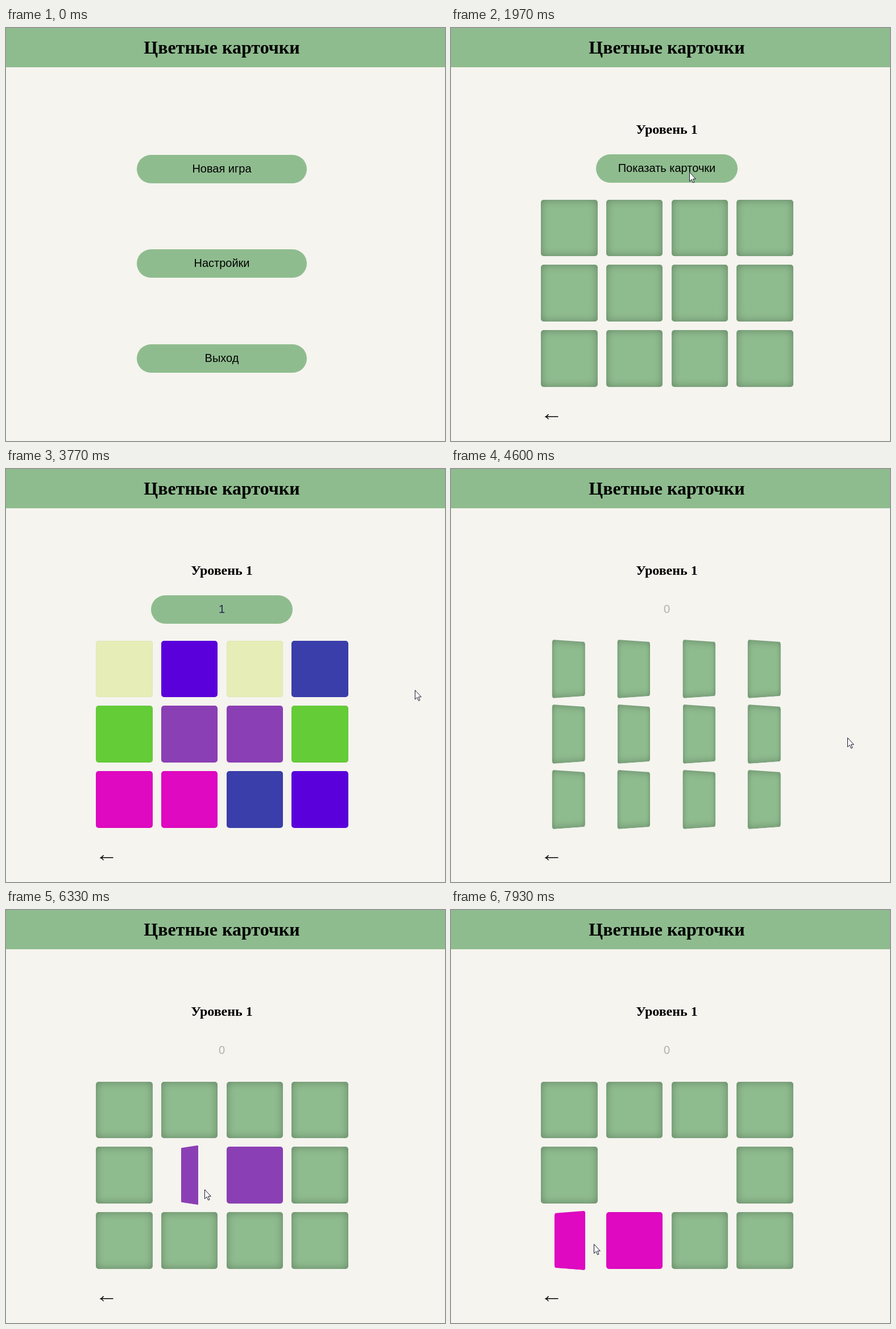
Animation of 772x726 px, one loop 8 s. Source, as an HTML page:

```html
<!DOCTYPE html>
<html lang="ru">
<head>
<meta charset="utf-8">
<title>Цветные карточки</title>
<style>
  html, body { margin: 0; width: 100%; height: 100%; overflow: hidden; background: #f5f4ef; }
  body { position: relative; color: #000; }
  header { position: absolute; inset: 0 0 auto; height: 69px; background: #8fbc8f; }
  h1, h2 {
    position: absolute; left: 0; width: 759px; margin: 0; text-align: center;
    font-family: "Liberation Serif", "Times New Roman", serif; font-weight: bold;
  }
  h1 { top: 0; font-size: 32px; line-height: 69px; }
  h2 { top: 163px; font-size: 24px; line-height: 30px; }
  .screen { position: absolute; inset: 0; opacity: 0; }
  .pill {
    position: absolute; left: 230px; width: 299px; height: 49.5px; border-radius: 25px;
    background: #8fbc8f; text-align: center;
    font: 20px/49.5px "Liberation Sans", Arial, sans-serif;
  }
  .show { left: 255px; top: 222px; width: 249px; }
  .count { color: #25274f; }
  .done { color: rgba(16, 16, 16, .3); background: none; }
  .cell { position: absolute; perspective: 1000px; }
  .card { position: absolute; inset: 0; transform-style: preserve-3d; }
  .face { position: absolute; inset: 0; border-radius: 5px; backface-visibility: hidden; }
  .back { background: #8fbc8f; box-shadow: inset 0 0 15px rgba(0, 0, 0, .3); }
  .front { transform: rotateY(180deg); box-shadow: inset 0 0 1px rgba(0, 0, 0, .2); }
  svg { position: absolute; left: 0; top: 0; overflow: visible; }
</style>
</head>
<body>
<header><h1>Цветные карточки</h1></header>
<div class="screen" id="menu"></div>
<div class="screen" id="game">
  <h2>Уровень 1</h2>
  <div class="pill show" id="ask">Показать карточки</div>
  <div class="pill show count" id="two">2</div>
  <div class="pill show count" id="one">1</div>
  <div class="pill show done" id="zero">0</div>
  <svg width="1" height="1" fill="none" stroke="#000" stroke-width="1.4">
    <path d="M167 683.3H188.5M171.5 679Q169.5 682 166.3 683.3Q169.5 684.6 171.5 687.6"/>
  </svg>
</div>
<svg id="cursor" width="13" height="21">
  <path d="M.5 .5V16.6L4.2 13.2L6.6 19L9 18L6.6 12.3H11.3Z" fill="#fff" stroke="#15152a"/>
</svg>

<script>
const LOOP = 8000;
const FLIP = 500;
const SPAN = LOOP + FLIP; // leaves room for a flip that the loop cuts short
const ENTER = 330, GAME_START = 1440, REVEAL = 2355, TICK = 1020;
const CONCEAL = REVEAL + 2 * TICK;

const $ = id => document.getElementById(id);
const tracks = [];

// steps: [ms, value, easing towards the next step]
function track(el, prop, steps) {
  const first = steps[0], last = steps[steps.length - 1];
  const frames = [[0, first[1]], ...steps, [SPAN, last[1]]].map(([ms, value, easing = 'linear']) =>
    ({ offset: ms / SPAN, [prop]: value, easing }));
  const anim = el.animate(frames, { duration: SPAN, fill: 'both' });
  anim.pause();
  tracks.push(anim);
}

function visible(el, from, to = SPAN) {
  const hold = 'steps(1)';
  track(el, 'opacity', [[0, from ? 0 : 1, hold], [from, 1, hold], [to, to < SPAN ? 0 : 1, hold]]);
}

function flips(el, times) {
  const turn = n => `rotateY(${n % 2 * 180}deg)`;
  track(el, 'transform', times.flatMap((ms, i) =>
    [[ms, turn(i), 'ease'], [ms + FLIP, turn(i + 1)]]));
}

function addBox(parent, className, text = '') {
  const el = document.createElement('div');
  el.className = className;
  el.textContent = text;
  return parent.appendChild(el);
}

const buttons = ['Новая игра', 'Настройки', 'Выход'].map((label, i) => {
  const button = addBox($('menu'), 'pill', label);
  button.style.top = 222.7 + i * 166.7 + 'px';
  return button;
});
track(buttons[0], 'transform', [[880, 'scale(1)', 'ease'], [1080, 'scale(1.05)']]);

visible($('menu'), 0, GAME_START);
visible($('game'), GAME_START);
visible($('cursor'), ENTER);
visible($('ask'), 0, REVEAL);
visible($('two'), REVEAL, REVEAL + TICK);
visible($('one'), REVEAL + TICK, CONCEAL);
visible($('zero'), CONCEAL);

const lime = '#64cc37', sand = '#e6edb7', indigo = '#5a00db';
const blue = '#3a3eaa', purple = '#8b3fb4', pink = '#de09c0';
const deck = [sand, indigo, sand, blue, lime, purple, purple, lime, pink, pink, blue, indigo];
const picks = { 6: 5200, 5: 6156, 9: 7010, 8: 7730 };

// Whole-pixel edges of the n-th card along one axis
function edges(origin, n) {
  const start = origin + n * 114.7;
  const from = Math.round(start);
  return [from + 'px', Math.round(start + 99.4) - from + 'px'];
}

deck.forEach((color, i) => {
  const cell = addBox($('game'), 'cell');
  const [left, width] = edges(158.3, i % 4);
  const [top, height] = edges(301.7, Math.floor(i / 4));
  Object.assign(cell.style, { left, width, top, height });
  const card = addBox(cell, 'card');
  addBox(card, 'face back');
  addBox(card, 'face front').style.background = color;
  flips(card, [REVEAL, CONCEAL, picks[i]].filter(Boolean));
  if (color === purple) visible(cell, 0, picks[5] + FLIP);
});

// Cursor moves: start, end, destination; it rests in between
const moves = [
  [ENTER, 1310, 419, 253],
  [2450, 2740, 606, 260, 'ease-in'],
  [2740, 3560, 717, 355],
  [3560, 4050, 720, 410],
  [4250, 4600, 697, 472],
  [4600, 5150, 430, 505],
  [5550, 5850, 349, 491],
  [6430, 6830, 330, 576],
  [7250, 7650, 251, 587]
];
let place = 'translate(746px, 712px)';
track($('cursor'), 'transform', moves.flatMap(([from, to, x, y, easing = 'ease-out']) => {
  const start = place;
  place = `translate(${x}px, ${y}px)`;
  return [[from, start, easing], [to, place]];
}));

let begin;
function render(now) {
  begin ??= now;
  const time = (now - begin) % LOOP;
  for (const anim of tracks) anim.currentTime = time;
  requestAnimationFrame(render);
}
requestAnimationFrame(render);
</script>
</body>
</html>
```
